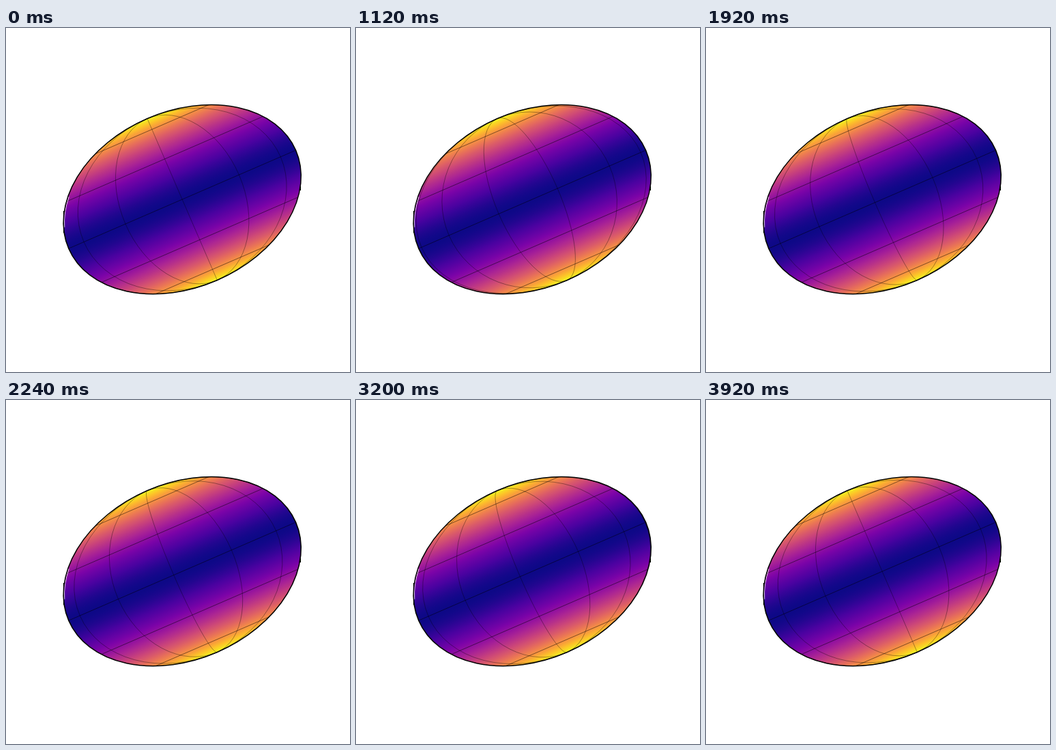
An HTML page with a canvas that plays this animation: 504x504 px, repeating every 4 s.

```html
<!DOCTYPE html>
<html lang="en">
<head>
<meta charset="utf-8">
<title>Rotating spheroid</title>
<style>
  html, body { margin: 0; width: 100%; height: 100%; overflow: hidden; background: #fff; }
  canvas { display: block; }
</style>
</head>
<body>
<canvas id="stage" width="504" height="504"></canvas>
<script>
const ctx = document.getElementById('stage').getContext('2d');
const RAD = Math.PI / 180;
const A = 181.3, B = 129;            // equatorial and polar radii
const TILT = -23.4 * RAD;
const STEP_MS = 80, STEPS = 50;
const PLASMA = ['0d0887', '4c02a1', '7e03a8', 'aa2395', 'cc4778', 'e66c5c', 'f89540', 'fdc527', 'f0f921']
  .map(hex => [0, 2, 4].map(i => parseInt(hex.slice(i, i + 2), 16)));

function plasma(value) {
  const pos = Math.min(Math.max(value, 0), 1) * (PLASMA.length - 1);
  const i = Math.min(Math.floor(pos), PLASMA.length - 2);
  const mixed = PLASMA[i].map((c, k) => Math.round(c + (PLASMA[i + 1][k] - c) * (pos - i)));
  return `rgb(${mixed})`;
}

// Surface gravity of a fast rotator, with a polar radius of 1; s = sine of latitude
const FLAT = A / B;
const SPIN_SQ = 2 * (1 - 1 / FLAT) / FLAT ** 2;
function gravity(s) {
  const rho = FLAT * Math.sqrt(1 - s * s);
  const pull = 1 / Math.hypot(rho, s) ** 3;
  return Math.hypot(rho * (pull - SPIN_SQ), s * pull);
}

// Gravity darkening, scaled to 0 at the equator and 1 at the poles
function brightness(s) {
  const glow = x => gravity(x) ** 0.6;
  return (glow(s) - glow(0)) / (glow(1) - glow(0));
}

const surface = ctx.createLinearGradient(0, -B, 0, B);
for (let i = 0; i <= 64; i++) surface.addColorStop(i / 64, plasma(brightness(i / 32 - 1)));

function stroke(color, width, trace) {
  ctx.beginPath();
  trace();
  ctx.strokeStyle = color;
  ctx.lineWidth = width;
  ctx.stroke();
}

function draw(spin) {
  ctx.setTransform(1, 0, 0, 1, 0, 0);
  ctx.fillStyle = '#fff';
  ctx.fillRect(0, 0, 504, 504);
  ctx.translate(258.2, 251.1);
  ctx.rotate(TILT);

  ctx.beginPath();
  ctx.ellipse(0, 0, A, B, 0, 0, 2 * Math.PI);
  ctx.fillStyle = surface;
  ctx.fill();

  for (let lat = -60; lat <= 60; lat += 30) {
    const x = A * Math.cos(lat * RAD), y = B * Math.sin(lat * RAD);
    stroke('rgba(0,0,0,.55)', 0.8, () => { ctx.moveTo(-x, y); ctx.lineTo(x, y); });
  }

  for (let lon = spin % 30 - 90; lon < 90; lon += 30) {
    const x = A * Math.sin(lon * RAD);
    stroke('rgba(0,0,0,.45)', 0.7, () =>
      ctx.ellipse(0, 0, Math.abs(x), B, 0, -Math.PI / 2, Math.PI / 2, x < 0));
  }

  // Thin gap between surface and rim on the left
  stroke('rgba(255,255,255,.8)', 1, () =>
    ctx.ellipse(0, 0, A - 1.4, B - 1.4, 0, 194 * RAD, 213 * RAD));
  stroke('#000', 1.5, () => ctx.ellipse(0, 0, A, B, 0, 0, 2 * Math.PI));

  ctx.setTransform(1, 0, 0, 1, 0, 0);
  stroke('#000', 1, () => {
    ctx.moveTo(84.5, 268); ctx.lineTo(84.5, 300);
    ctx.moveTo(431.5, 232); ctx.lineTo(431.5, 238);
  });
}

function tick() {
  const step = Math.floor(performance.now() / STEP_MS) % STEPS;
  draw(step * 360 / (STEPS - 1));
  requestAnimationFrame(tick);
}
tick();
</script>
</body>
</html>
```
